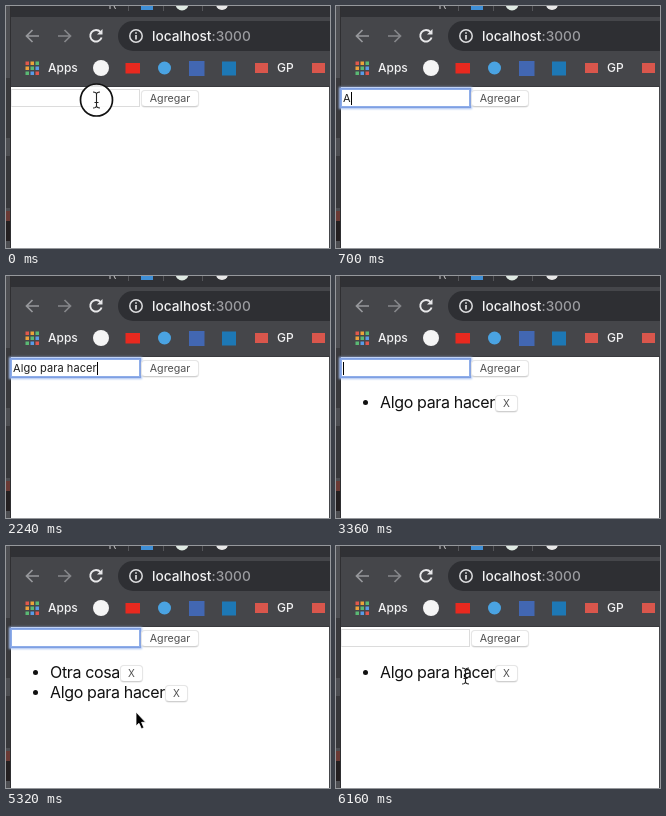
An HTML page for the animation above (6300 ms loop, 324 px wide and 242 px high).

```html
<!DOCTYPE html>
<html lang="es">
<head>
<meta charset="utf-8">
<title>Lista de tareas</title>
<style>
  html, body { margin: 0; width: 100%; height: 100%; overflow: hidden; }
  body { position: relative; background: #45464a; font-family: Inter, Roboto, sans-serif; }
  #stage { position: absolute; left: 0; top: 0; width: 324px; height: 242px; overflow: hidden; }
  #stage > * { position: absolute; }
  .chrome, .pointer { left: 0; top: 0; }
  .chrome text { fill: #f1f1f2; font-size: 12px; font-weight: 500; }
  .page { left: 5px; top: 81px; width: 318px; height: 161px; background: #fff; }
  .page > * { position: absolute; box-sizing: border-box; }
  .field {
    left: 0; top: 2px; width: 129px; height: 18px;
    border: 1px solid #dcdcdc; border-left-color: #eee;
    padding-left: 1px; background: #fff; color: #1c1c1c;
    display: flex; align-items: center; font-size: 11px; letter-spacing: .07px; white-space: pre;
  }
  .field.focus { border-color: #8eade9; box-shadow: 0 0 0 1px #7f9fe2, 0 0 2px 2px #a5bff0; }
  .caret { width: 1px; height: 13px; background: #000; }
  .btn {
    box-sizing: border-box; height: 17px;
    border: 1px solid #e6e6e6; border-bottom-color: #cfcfcf; border-radius: 4px;
    background: #fff; color: #505050; font-size: 10.7px; line-height: 15px;
    letter-spacing: 0; text-align: center; box-shadow: 0 .5px 1px #e2e2e2;
  }
  .add { left: 130px; top: 2.5px; width: 58px; }
  ul { left: 0; top: 35px; margin: 0; padding: 0 0 0 39px; list-style: none; }
  li {
    position: relative; display: flex; align-items: center; height: 20px;
    font-size: 16px; letter-spacing: -.35px; color: #111; white-space: nowrap;
  }
  li::before {
    content: ""; position: absolute; left: -17px; top: 7.5px;
    width: 5px; height: 5px; border-radius: 50%; background: #111;
  }
  li .btn { position: relative; top: 1px; width: 23px; font-size: 10px; }
  .menu {
    left: 4px; top: 102px; width: 192px; height: 150px; padding-top: 8px;
    box-sizing: border-box; border-radius: 3px; background: #393c3f;
    color: #f2f2f2; font-size: 13px; font-weight: 500;
  }
  .menu div { height: 36px; line-height: 36px; padding-left: 12px; }
</style>
</head>
<body>
<div id="stage">
  <svg class="chrome" width="324" height="242">
    <rect width="324" height="242" fill="#45464a"/>
    <rect width="324" height="11" fill="#303135"/>
    <path d="M122.500 0V5M157.500 0V5M196.500 0V5" stroke="#55565a"/>
    <path d="M104 0V3M108 0L109.500 3" stroke="#c9c9cb"/>
    <rect x="135" y="-4" width="12" height="8" fill="#3f8fd6"/>
    <circle cx="176" cy="-2" r="6.500" fill="#dfeae3"/>
    <circle cx="216" cy="-2" r="6" fill="#e8e8e8"/>
    <rect x="112" y="15" width="240" height="30" rx="15" fill="#2e2f33"/>
    <g fill="none" stroke-width="1.700">
      <path d="M33 30H21M26.500 24L20.500 30L26.500 36" stroke="#97989c"/>
      <path d="M52 30H64M58.500 24L64.500 30L58.500 36" stroke="#85868a"/>
      <path d="M94.500 26A5.800 5.800 0 1 0 95.600 31.500" stroke="#e8e8ea" stroke-width="1.900"/>
      <circle cx="130" cy="30" r="6.200" stroke="#dcdcde" stroke-width="1.500"/>
      <path d="M130 29V33.500M130 26.300V27.800" stroke="#dcdcde"/>
    </g>
    <path d="M96.500 23V28.500H91Z" fill="#e8e8ea"/>
    <text x="146" y="35" style="font-size:13.700px">localhost<tspan fill="#9b9ca0">:3000</tspan></text>
    <g id="grid"></g>
    <text x="42" y="66">Apps</text>
    <circle cx="95" cy="62" r="8" fill="#f5f5f5"/>
    <rect x="119.500" y="57" width="14.500" height="10.500" fill="#e8291f"/>
    <circle cx="158.500" cy="62" r="6.500" fill="#4aa3e2"/>
    <rect x="183" y="55" width="15.500" height="15" fill="#4267b2"/>
    <rect x="216" y="55.500" width="14" height="14" fill="#1d78b5"/>
    <rect x="249" y="57" width="13" height="10" fill="#d9564c"/>
    <text x="271" y="66">GP</text>
    <rect x="306" y="57" width="13" height="10" fill="#d9564c"/>
    <rect width="4" height="242" fill="#4d4e52"/>
    <rect y="72" width="4" height="60" fill="#3a3a3d"/>
    <rect y="150" width="4" height="52" fill="#37373a"/>
    <rect y="205" width="4" height="10" fill="#6b3a35"/>
    <rect y="215" width="4" height="20" fill="#241f20"/>
    <path d="M4.500 0V242" stroke="#2f2f32"/>
    <path d="M5 80.500H324" stroke="#393a3e"/>
  </svg>

  <div class="page">
    <div class="field" id="field"><span id="typed"></span><i class="caret" id="caret"></i></div>
    <div class="btn add">Agregar</div>
    <ul>
      <li id="second">Otra cosa<span class="btn">X</span></li>
      <li id="first">Algo para hacer<span class="btn">X</span></li>
    </ul>
  </div>

  <div class="menu" id="menu">
    <div>dadada</div><div>Some todo</div><div>dadad</div><div>somefing</div>
  </div>

  <svg class="pointer" width="324" height="242">
    <g id="pointer">
      <circle id="ring" r="16" fill="#fff" fill-opacity=".85" stroke="#111" stroke-width="1.700"/>
      <path id="beam" fill="none" stroke="#222" stroke-width="1.100"
        d="M-3.500 -8Q0 -8 0 -5.500Q0 -8 3.500 -8M0 -6V6M-3.500 8Q0 8 0 5.500Q0 8 3.500 8M-2 2.500H2"/>
      <path id="arrow" d="M0 -1V13L3 10.300L5.400 15.800L7.900 14.700L5.600 9.300H9.600Z" fill="#000" stroke="#fff" stroke-width=".8"/>
    </g>
  </svg>
</div>

<script>
const LOOP = 6300, STEP = 70;
const FOCUS = 70, SUBMIT_1 = 2310, SUBMIT_2 = 4690, PRESS = 5950, REMOVE = 6090;

const entries = [
  { text: 'Algo para hacer', end: SUBMIT_1,
    keys: [490, 770, 910, 1050, 1260, 1400, 1470, 1540, 1610, 1680, 1750, 1820, 1960, 2030, 2170] },
  { text: 'Otra cosa', end: SUBMIT_2,
    keys: [3570, 3780, 4060, 4130, 4200, 4270, 4340, 4480, 4550] }
];

// time, x, y of the pointer after it reappears
const path = [
  [5040, 91, 97], [5110, 101, 118], [5180, 117, 152], [5250, 128, 170],
  [5320, 130, 167], [5460, 131, 148], [5600, 128, 132], [5810, 129.5, 130]
];

const $ = id => document.getElementById(id);
const show = (id, on) => { $(id).style.display = on ? '' : 'none'; };
const within = (t, a, b) => t >= a && t < b;

const gridColors = ['#e2574c', '#eda23b', '#5bb974', '#5a9be6'];
for (let i = 0; i < 9; i++) {
  const row = Math.floor(i / 3), col = i % 3;
  const dot = document.createElementNS('http://www.w3.org/2000/svg', 'rect');
  const attrs = {
    x: 19.5 + col * 5, y: 55.5 + row * 5, width: 3.5, height: 3.5,
    fill: gridColors[(row + col) % 4]
  };
  for (const k in attrs) dot.setAttribute(k, attrs[k]);
  $('grid').append(dot);
}

function typedAt(t) {
  const entry = entries.find(e => t < e.end);
  return entry ? entry.text.slice(0, entry.keys.filter(k => k <= t).length) : '';
}

function lastInput(t) {
  const times = [FOCUS, ...entries.flatMap(e => [...e.keys, e.end])];
  return Math.max(...times.filter(k => k <= t));
}

function pointerAt(t) {
  if (t < path[0][0]) return [90.5, 94];
  const i = path.findIndex(p => p[0] > t);
  if (i < 0) return path[path.length - 1].slice(1);
  const [t0, x0, y0] = path[i - 1], [t1, x1, y1] = path[i];
  const k = (t - t0) / (t1 - t0);
  return [x0 + (x1 - x0) * k, y0 + (y1 - y0) * k];
}

function render(t) {
  const focused = within(t, FOCUS, PRESS);
  $('field').classList.toggle('focus', focused);
  $('typed').textContent = typedAt(t);
  show('caret', focused && (t - lastInput(t)) % 1000 < 500);

  show('first', t >= SUBMIT_1);
  show('second', within(t, SUBMIT_2, REMOVE));

  show('menu', within(t, FOCUS, 630));
  $('menu').style.opacity = t < 490 ? 1 : Math.max(0, 1 - (t - 420) / 210);

  const [x, y] = pointerAt(t);
  $('pointer').setAttribute('transform', `translate(${x} ${y})`);
  show('ring', t < FOCUS || within(t, PRESS, REMOVE));
  show('beam', t < 490 || t >= REMOVE);
  show('arrow', within(t, path[0][0], REMOVE));
}

function tick() {
  const t = performance.now() % LOOP;
  render(Math.floor(t / STEP) * STEP);
  requestAnimationFrame(tick);
}
tick();
</script>
</body>
</html>
```
